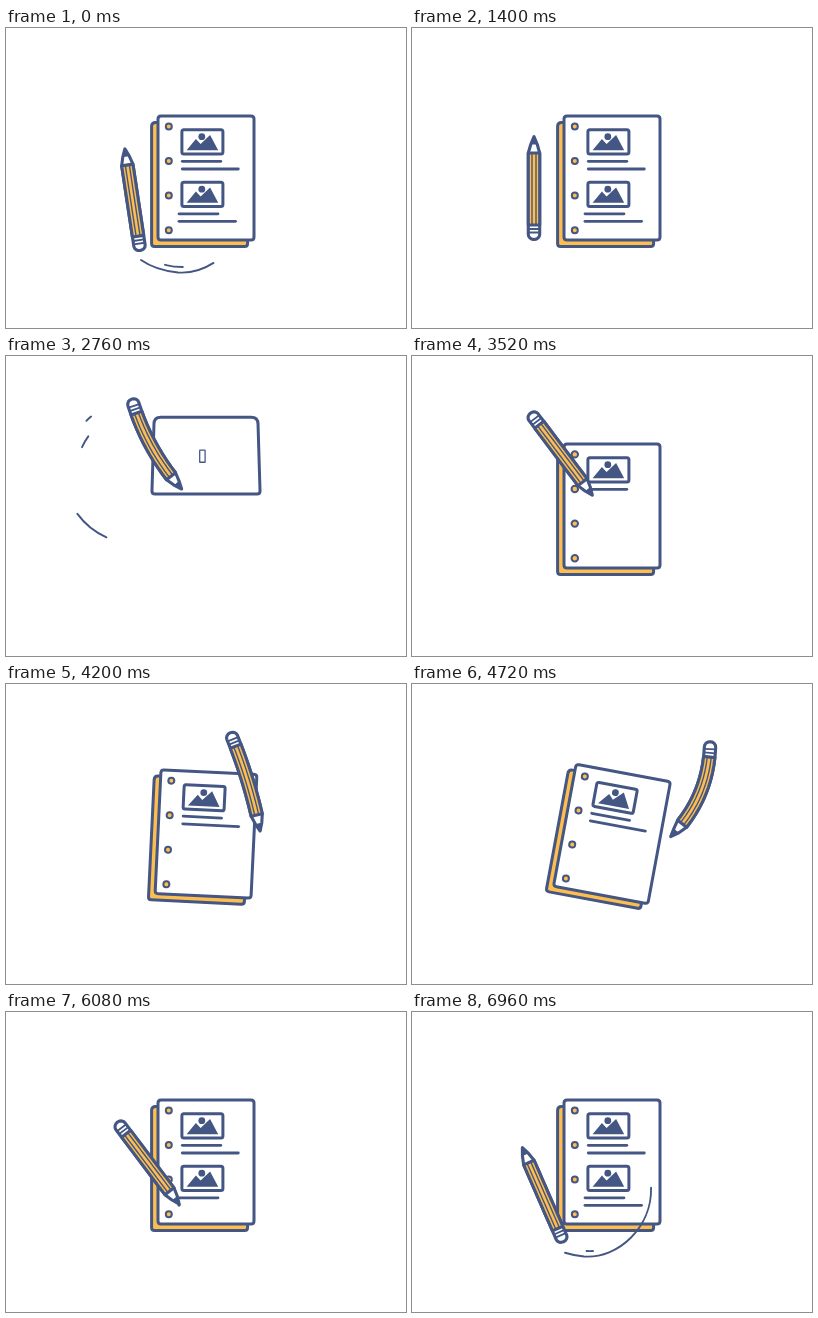
Animation, 400 px wide and 300 px high, one loop 7000 ms. Source, as an HTML page:

```html
<!DOCTYPE html>
<html lang="en">
<head>
<meta charset="utf-8">
<title>Pencil and notebook</title>
<style>
  html, body { margin: 0; width: 100%; height: 100%; overflow: hidden; background: #fff; }
  svg { display: block; width: 100vw; height: 100vh; }
</style>
</head>
<body>
<svg id="stage" viewBox="0 0 400 300" fill="none" stroke="#445684" stroke-width="3"
     stroke-linecap="round" stroke-linejoin="round"></svg>
<script>
const LOOP = 7000, INK = '#445684', GOLD = '#fdbd4f', RAD = Math.PI / 180;
const stage = document.getElementById('stage');

function add(tag, attrs, parent = stage) {
  const el = document.createElementNS('http://www.w3.org/2000/svg', tag);
  parent.appendChild(el);
  return set(el, attrs);
}
function set(el, attrs) {
  for (const k in attrs) el.setAttribute(k, attrs[k]);
  return el;
}
const show = (el, on) => set(el, { display: on ? 'inline' : 'none' });
const lerp = (a, b, x) => a + (b - a) * x;
const part = (t, a, b) => Math.min(1, Math.max(0, (t - a) / (b - a)));
const smooth = x => x * x * (3 - 2 * x);
const backOut = x => 1 + 2.9 * (x - 1) ** 3 + 1.9 * (x - 1) ** 2;

// Notebook
const book = add('g');
const backEl = add('path', { fill: GOLD }, book);
const pageEl = add('path', { fill: '#fff' }, book);
const holes = [0, 1, 2, 3].map(i =>
  add('circle', { cx: 162.8, cy: 98.4 + 34.6 * i, fill: GOLD, 'stroke-width': 2 }, book));
const pics = [0, 1].map(() => {
  const g = add('g', {}, book), frame = add('rect', {}, g);
  const view = add('g', { fill: INK, stroke: 'none' }, g);
  add('path', { d: 'M-15.8 8.4L-6.5-2.8L-1.8 2.2L7.7-6.8L15.8 8.4Z' }, view);
  add('circle', { cx: -.6, cy: -5.2, r: 3.4 }, view);
  return { g, frame, view };
});
const lines = [
  { x1: 176.3, x2: 214.8, y: 133.3, from: 3240, to: 3400 },
  { x1: 176.3, x2: 232.3, y: 141, from: 3550, to: 3780 },
  { x1: 173, x2: 212, y: 185.8, from: 5720, to: 5900 },
  { x1: 173, x2: 229.5, y: 193.3, from: 6080, to: 6290 }
];
for (const l of lines) l.el = add('line', { 'stroke-width': 2.8 }, book);

function panel(x, y, a, b, h, r) {
  const top = y - h, low = y + h;
  return `M${x - a + r} ${top}H${x + a - r}Q${x + a} ${top} ${x + a} ${top + r}` +
    `L${x + b} ${low - 3}Q${x + b} ${low} ${x + b - 3} ${low}H${x - b + 3}` +
    `Q${x - b} ${low} ${x - b} ${low - 3}L${x - a} ${top + r}Q${x - a} ${top} ${x - a + r} ${top}Z`;
}

function drawPic({ g, frame, view }, y, kx, ky) {
  show(g, kx > .01);
  set(g, { transform: `translate(196.4 ${y})` });
  const w = 41 * kx, h = 24.4 * ky, m = Math.max(0, (kx - .3) / .7);
  set(frame, { x: -w / 2, y: -h / 2, width: w, height: h, rx: 2 * kx,
    'stroke-width': Math.min(3, 1 + 2 * kx) });
  set(view, { transform: `scale(${m})` });
}

function drawBook(t) {
  const old = t < 2300;
  const since = (a, b) => old ? 1 : part(t, a, b);
  const size = 1 - part(t, 1840, 2240) ** 3;
  const lean = 10.5 * (smooth(part(t, 4000, 4600)) - smooth(part(t, 4740, 5240)));
  show(book, old ? size > .02 : t > 2520);
  set(book, { transform: old
    ? `translate(200 150) scale(${size}) translate(-200 -150)`
    : `rotate(${lean} 200 150)` });

  // A small card pops up, then drops and stretches into the page
  const pop = smooth(since(2520, 2760)), drop = since(2760, 3120), fall = drop && backOut(drop);
  const half = lerp(53, 48, fall) * pop + 11 * Math.sin(Math.PI * drop);
  const flare = 1 - drop, y = lerp(99, 150, fall), h = lerp(38, 62, fall) * pop;
  set(pageEl, { d: panel(200, y, half - flare, half + flare, h, 3 + 4 * flare * pop) });
  const slide = since(3120, 3500);
  show(backEl, slide > 0);
  const shift = 6.4 * backOut(slide);
  set(backEl, { d: panel(200 - shift, y + shift, half, half, h, 4) });

  holes.forEach((el, i) => {
    const start = 3200 + (i % 2) * 140, r = since(start, start + 420);
    show(el, r > 0);
    set(el, { r: 3 * Math.max(0, backOut(r)) });
  });
  drawPic(pics[0], lerp(100, 113.9, fall), lerp(.12, 1, fall) * since(2700, 2760), lerp(.49, 1, fall));
  const second = Math.max(0, backOut(since(5400, 5700)));
  drawPic(pics[1], 166.4, second, second);
  for (const { x1, x2, y, from, to, el } of lines) {
    const p = smooth(since(from, to));
    show(el, p > 0);
    set(el, { x1, y1: y, x2: lerp(x1, x2, p), y2: y });
  }
}

// Motion trails
const ring = [0, 1, 2].map(() => add('path', { 'stroke-width': 1.9 }));
const sweep = add('path', {
  d: 'M239 174C241 214 207 247 172 244.5C157 243 145 239 135 232',
  pathLength: 100, 'stroke-width': 1.9
});
const dash = add('path', { d: 'M181 239Q170 239.5 159 236.8', pathLength: 100, 'stroke-width': 1.9 });

function arc(el, r, from, to) {
  const pt = d => `${130 + r * Math.cos(d * RAD)} ${115 + r * Math.sin(d * RAD)}`;
  show(el, to - from > .5);
  set(el, { d: `M${pt(from)}A${r} ${r} 0 0 1 ${pt(to)}` });
}
function stretch(el, from, to) {
  show(el, to - from > .005);
  set(el, { 'stroke-dasharray': `${(to - from) * 100} 300`, 'stroke-dashoffset': -from * 100 });
}

function drawTrails(t, late) {
  const head = lerp(114, 230.5, smooth(part(t, 2320, 2560))), gap = part(t, 2600, 2865);
  arc(ring[0], 72.6, 114, Math.min(head, lerp(190, 114, gap)));
  arc(ring[1], 70.6, lerp(190, 231, gap ** .3), head);
  arc(ring[2], 59, lerp(150, 216, part(t, 2500, 2820)), lerp(150, 216, smooth(part(t, 2400, 2640))));
  stretch(sweep, part(late, 6960, 7045), part(late, 6840, 6980));
  stretch(dash, part(late, 6985, 7070), part(late, 6945, 7000));
}

// Pencil poses: time, centre x, centre y, clockwise angle, bend
const writeAt = (t, x, y) => [t, x - 30.6, y - 42, 143, 0];
const strokes = lines.map(l => [writeAt(l.from, l.x1, l.y), writeAt(l.to, l.x2, l.y)]);
const LAND = 6960;
const poses = [
  [1960, 122, 160, 0, 0], [2480, 132, 108, 85, 5], [2760, 151, 88, 151, 6],
  ...strokes[0], ...strokes[1], [3940, 202, 98, 143, 0],
  [4500, 284, 98, 195, -8], [4720, 278, 105, 202.6, -11],
  writeAt(5340, lines[2].x1, lines[2].y), ...strokes[2], ...strokes[3],
  [6340, 199, 151, 143, 0], [6800, 158, 178, 280, 0], [LAND, 131, 183, 336.3, 0]
];

// Monotone cubic through the poses
function poseAt(t) {
  let i = 0;
  while (i < poses.length - 2 && t >= poses[i + 1][0]) i++;
  const slope = (j, k) => (poses[j + 1][k] - poses[j][k]) / (poses[j + 1][0] - poses[j][0]);
  const tangent = (j, k) => {
    if (j === 0) return 0;
    if (j === poses.length - 1) return slope(j - 1, k);
    const a = slope(j - 1, k), b = slope(j, k);
    return a * b <= 0 ? 0 : 2 * a * b / (a + b);
  };
  const x = part(t, poses[i][0], poses[i + 1][0]), h = poses[i + 1][0] - poses[i][0];
  return [1, 2, 3, 4].map(k => lerp(poses[i][k], poses[i + 1][k], smooth(x)) +
    h * x * (1 - x) * (tangent(i, k) * (1 - x) - tangent(i + 1, k) * x));
}

// After landing the pencil swings to rest
function settle(age) {
  const drift = Math.exp(-age / 60);
  const swing = -23.7 * Math.exp(-age / 150) * Math.cos(age / 240 * 2 * Math.PI);
  return [122 + 9 * drift, 160 + 23 * drift, swing, 0];
}

const pencil = add('g', { 'stroke-width': 3.1 });
const shell = add('path', { fill: '#fff' }, pencil);
const body = add('path', { fill: GOLD }, pencil);
const grain = add('path', { 'stroke-width': 1.4 }, pencil);
const bands = add('path', { 'stroke-width': 1.8 }, pencil);
const lead = add('path', { fill: INK, 'stroke-width': 1 }, pencil);

function drawPencil([cx, cy, angle, bend]) {
  const dx = Math.sin(angle * RAD), dy = -Math.cos(angle * RAD), reach = 52.5, w = 5.7;
  // u runs across, s along towards the tip
  const at = ([u, s]) => {
    const k = s / reach, m = -2 * bend * k / reach, len = Math.hypot(1, m);
    const along = s - u * m / len, across = bend * (1 - k * k) + u / len;
    return `${cx + dx * along - dy * across} ${cy + dy * along + dx * across}`;
  };
  const poly = pts => 'M' + pts.map(at).join('L');
  const side = (u, from, to) => Array.from({ length: 11 }, (_, i) => [u, lerp(from, to, i / 10)]);
  const cap = Array.from({ length: 9 }, (_, i) =>
    [w * Math.cos(i * Math.PI / 8), -46.5 - 5 * Math.sin(i * Math.PI / 8)]);
  const band = s => poly([[-w, s], [w, s]]);
  set(shell, { d: poly([[0, 51.3], [3.3, 43.5], ...side(w, 35, -46), ...cap,
    ...side(-w, -46, 35), [-3.3, 43.5]]) + 'Z' });
  set(body, { d: poly([...side(w, 35, -37), ...side(-w, -37, 35)]) + 'Z' });
  set(grain, { d: poly(side(-2, 34, -37)) + poly(side(2, 34, -37)) });
  set(bands, { d: band(-41) + band(-44.5) });
  set(lead, { d: poly([[0, 51.3], [2.8, 44], [-2.8, 44]]) + 'Z' });
}

function draw(t) {
  const late = t < 1800 ? t + LOOP : t;
  drawBook(t);
  drawTrails(t, late);
  drawPencil(late >= LAND ? settle(late - LAND) : poseAt(t));
}

const begin = performance.now();
function frame(now) {
  draw(Math.max(0, now - begin) % LOOP);
  requestAnimationFrame(frame);
}
draw(0);
requestAnimationFrame(frame);
</script>
</body>
</html>
```
